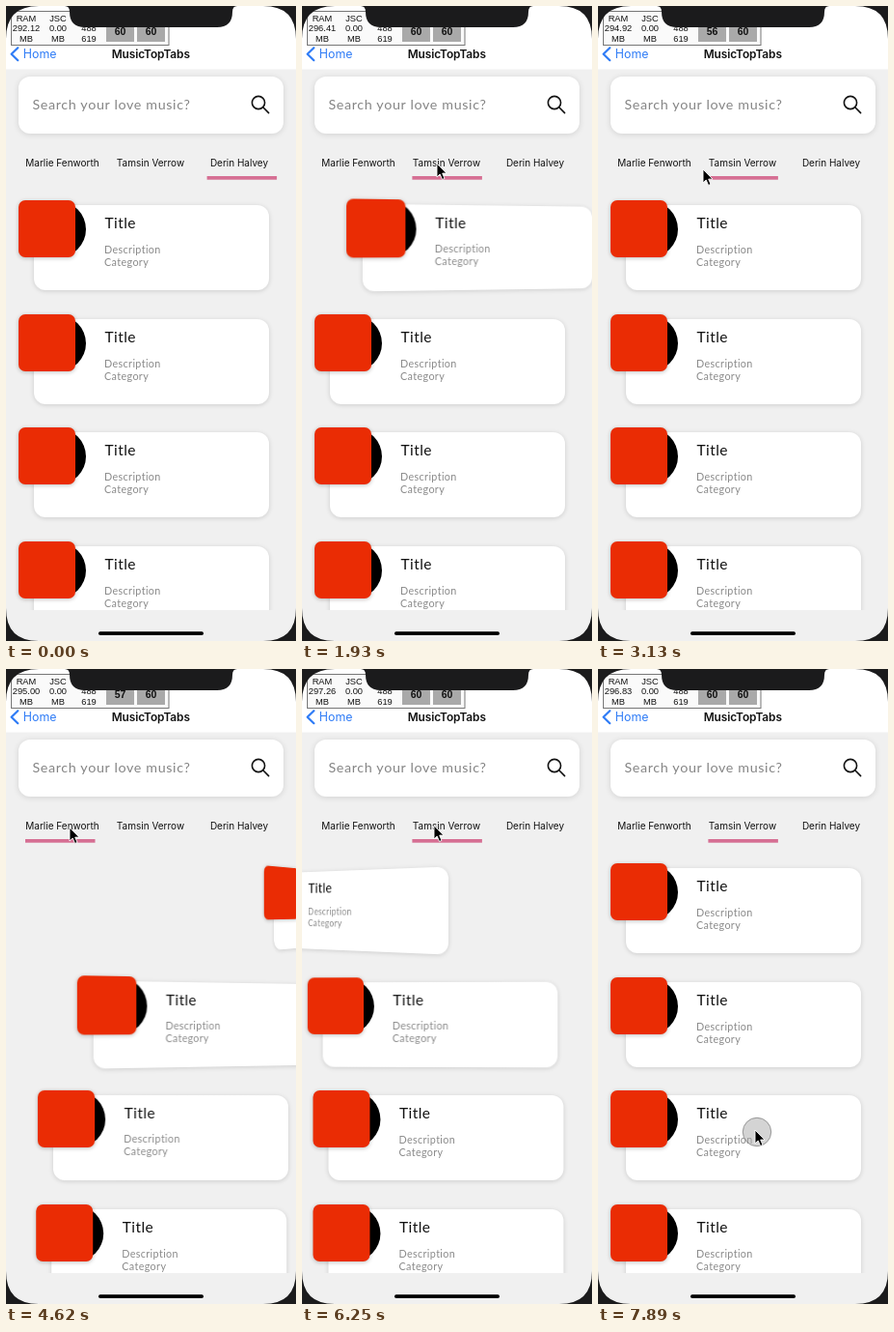
Write an HTML page that moves like this. It is 301 by 657 pixels and loops after 8000 ms.

```html
<!DOCTYPE html>
<html lang="en">
<head>
<meta charset="utf-8">
<title>Music tabs</title>
<style>
html, body { margin: 0; width: 100%; height: 100%; overflow: hidden; background: #f0f0f0; }
#stage { position: relative; width: 301px; height: 657px; overflow: hidden; background: #f0f0f0; }
#stage > svg { position: absolute; left: 0; top: 0; }
.row svg { position: absolute; left: 0; top: 0; overflow: visible; }
#list { position: absolute; left: 0; top: 0; width: 301px; height: 625px; overflow: hidden; }
.row { position: absolute; left: 0; width: 301px; height: 94px; }
.row div, #search { position: absolute; }
#search { left: 13px; top: 73px; width: 275px; height: 59px; border-radius: 12px; background: #fff; box-shadow: 0 1px 6px rgba(0,0,0,.13); }
.card { left: 28.5px; top: 5px; width: 244px; height: 88px; border-radius: 12px; background: #fff; box-shadow: 0 1px 5px rgba(0,0,0,.15); }
.disc { left: 25px; top: 1px; width: 58px; height: 58px; border-radius: 50%; background: #000; }
.cover { left: 12.5px; top: 0; width: 59.5px; height: 59px; border-radius: 7px; background: #ea2c04; box-shadow: 0 1px 4px rgba(0,0,0,.25); }
text { white-space: pre; }
.ui { font-family: Inter, sans-serif; }
.soft { font-family: Lato, sans-serif; }
.stat { font: 9.3px "Liberation Sans", Arial, sans-serif; text-anchor: middle; fill: #111; }
.mid { text-anchor: middle; }
</style>
</head>
<body>
<div id="stage">
  <div id="list"></div>
  <div id="search"></div>
  <svg width="301" height="657" viewBox="0 0 301 657">
    <rect width="301" height="65.5" fill="#fff"/>
    <g id="stats">
      <rect x="5.5" y="5.5" width="163.5" height="35" fill="#fafafa" stroke="#777"/>
      <rect x="104" y="10" width="29" height="27" fill="#a9a9a9"/>
      <rect x="136" y="10" width="29" height="27" fill="#a9a9a9"/>
      <g class="stat">
        <text x="21" y="15.5">RAM</text><text id="ram" x="21" y="26"></text><text x="21" y="36.5">MB</text>
        <text x="54" y="15.5">JSC</text><text x="54" y="26">0.00</text><text x="54" y="36.5">MB</text>
        <text x="86" y="26">488</text><text x="86" y="36.5">619</text>
        <text id="fps" x="118.5" y="29.5" font-size="10.5" font-weight="bold"></text>
        <text x="150.5" y="29.5" font-size="10.5" font-weight="bold">60</text>
      </g>
    </g>
    <path d="M12.3 43.2L5.6 49.7L12.3 56.2" fill="none" stroke="#2f7cf6" stroke-width="2.2" stroke-linecap="round" stroke-linejoin="round"/>
    <text class="ui" x="17.8" y="54" font-size="12.4" fill="#2f7cf6">Home</text>
    <text class="ui mid" x="150.3" y="54" font-size="11.9" font-weight="600" letter-spacing="-.1" fill="#111">MusicTopTabs</text>
    <text class="soft" x="27.5" y="106.8" font-size="14.3" letter-spacing=".64" fill="#858585">Search your love music?</text>
    <g fill="none" stroke="#111" stroke-width="1.6" stroke-linecap="round">
      <circle cx="262" cy="100" r="6.6"/><path d="M266.8 104.8L272.6 110.6"/>
    </g>
    <g id="tabs" class="ui mid" font-size="10" fill="#111"></g>
    <rect id="bar" y="176" width="72.5" height="3.7" fill="#d66f93"/>
    <rect x="96" y="647.3" width="109" height="3.7" rx="1.8" fill="#000"/>
    <path fill="#1b1b1c" d="M61 0Q66 0 66 6Q66 22 82 22H219Q235 22 235 6Q235 0 240 0Z"/>
    <path fill="#1b1b1c" fill-rule="evenodd" d="M0 0H301V657H0ZM34 0Q0 0 0 34V623Q0 657 34 657H267Q301 657 301 623V34Q301 0 267 0Z"/>
    <g id="pointer">
      <circle id="press" cx="2" cy="2" r="14.7" fill="#aaa" fill-opacity=".5" stroke="#858585" stroke-width=".8"/>
      <path d="M0 0V14L3.2 11L5.6 16.5L8 15.4L5.7 10.1H10Z" fill="#000" stroke="#fff" stroke-width=".9" stroke-linejoin="round"/>
    </g>
  </svg>
</div>
<script>
const LOOP = 8000, TICK = 148.9, WIDTH = 301;
const $ = id => document.getElementById(id);

const tabs = [["Marlie Fenworth", 58.5, 20], ["Tamsin Verrow", 150, 114.4], ["Derin Halvey", 242, 208.6]];
$("tabs").innerHTML = tabs.map(([name, x]) => `<text x="${x}" y="165.7">${name}</text>`).join("");

// Tab changes: start time, new tab, direction of travel
const moves = [[1783, 1, 1], [4316, 0, 1], [6025, 1, -1]];
const rams = [[0, "292.12"], [1780, "296.41"], [2820, "294.92"], [4310, "295.00"], [6100, "297.26"], [7140, "296.83"]];
const rates = [[0, 60], [2820, 56], [4310, 57], [5355, 60]];
const presses = [1340, 3573, 5658, 7891];
const path = [
  [149, 240, 288], [447, 190, 240], [745, 141, 182], [893, 127, 168], [1042, 140, 163],
  [2680, 140, 163], [2978, 132, 167], [3127, 109, 169], [3424, 71, 166], [3573, 66, 164],
  [5211, 66, 164], [5360, 82, 165], [5509, 116, 164], [5658, 137, 162],
  [6998, 137, 162], [7296, 145, 255], [7594, 158, 425], [7743, 163, 479], [7892, 163, 477]
];
// Per row: when it starts to leave and when it has arrived, after the tab change
const leaveAt = [34, 169, 264, 375], arriveAt = [440, 627, 780, 930];

function makePage() {
  return leaveAt.map((_, i) => {
    const row = document.createElement("div");
    row.className = "row";
    row.style.top = 201 + 117.7 * i + "px";
    row.innerHTML = `<div class="card"></div><div class="disc"></div><div class="cover"></div>
      <svg class="soft" width="301" height="94">
        <text x="102.5" y="29" font-size="15.5" letter-spacing=".45" fill="#111">Title</text>
        <g font-size="10.8" letter-spacing=".36" fill="#8a8a8a">
          <text x="102" y="54.5">Description</text><text x="102" y="67.5">Category</text>
        </g>
      </svg>`;
    $("list").append(row);
    return row;
  });
}
const oldPage = makePage(), newPage = makePage();

const clamp = (v, a, b) => Math.min(b, Math.max(a, v));
const latest = (list, t) => list.filter(e => e[0] <= t).pop();
const ease = u => u < .5 ? 4 * u ** 3 : 1 - 4 * (1 - u) ** 3;
const lag = ms => Math.min(420, 3.75e-4 * Math.max(0, ms) ** 2.4);

// Slides a row by the page scroll plus its own swing around the vertical axis
function place(row, scroll, extra) {
  const angle = Math.sign(extra) * 60 * (1 - Math.exp(-Math.abs(extra) / 300));
  row.style.visibility = Math.abs(scroll + extra) > 560 ? "hidden" : "visible";
  row.style.transform = `translateX(${scroll}px)` + (Math.abs(extra) < .05 ? "" :
    ` perspective(400px) translateX(${extra * .3}px) rotateY(${angle}deg) translateX(${extra * .7}px)`);
}

function drawPages(move, t) {
  const [start, , dir] = move || [t, 2, 1];
  const age = t - start;
  const scroll = move ? WIDTH * ease(clamp((age - 173) / 513, 0, 1)) : 0;
  leaveAt.forEach((leave, i) => {
    place(oldPage[i], dir * scroll, move ? dir * lag(age - leave) : 0);
    place(newPage[i], dir * (scroll - WIDTH), move ? -dir * lag(arriveAt[i] - age) : -dir * 420);
  });
  if (!move) newPage.forEach(row => row.style.visibility = "hidden");
}

function drawPointer(t) {
  const next = path.findIndex(p => p[0] > t);
  const b = path[next < 0 ? path.length - 1 : next], a = next > 0 ? path[next - 1] : b;
  const u = a === b ? 0 : (t - a[0]) / (b[0] - a[0]);
  const at = k => a[k] + (b[k] - a[k]) * u;
  $("pointer").setAttribute("transform", `translate(${at(1)} ${at(2)})`);
  $("pointer").setAttribute("visibility", t < 140 ? "hidden" : "visible");
  $("press").style.display = presses.some(p => Math.abs(t - p) < 20) ? "" : "none";
}

function draw(now) {
  // The screen advances in even ticks
  const t = Math.floor((now % LOOP + 12) / TICK) * TICK;
  const move = latest(moves, t);
  drawPages(move, t);
  drawPointer(t);
  $("bar").setAttribute("x", tabs[move ? move[1] : 2][2]);
  $("ram").textContent = latest(rams, t)[1];
  $("fps").textContent = latest(rates, t)[1];
}

const begin = performance.now();
function frame() {
  draw(performance.now() - begin);
  requestAnimationFrame(frame);
}
frame();
</script>
</body>
</html>
```
